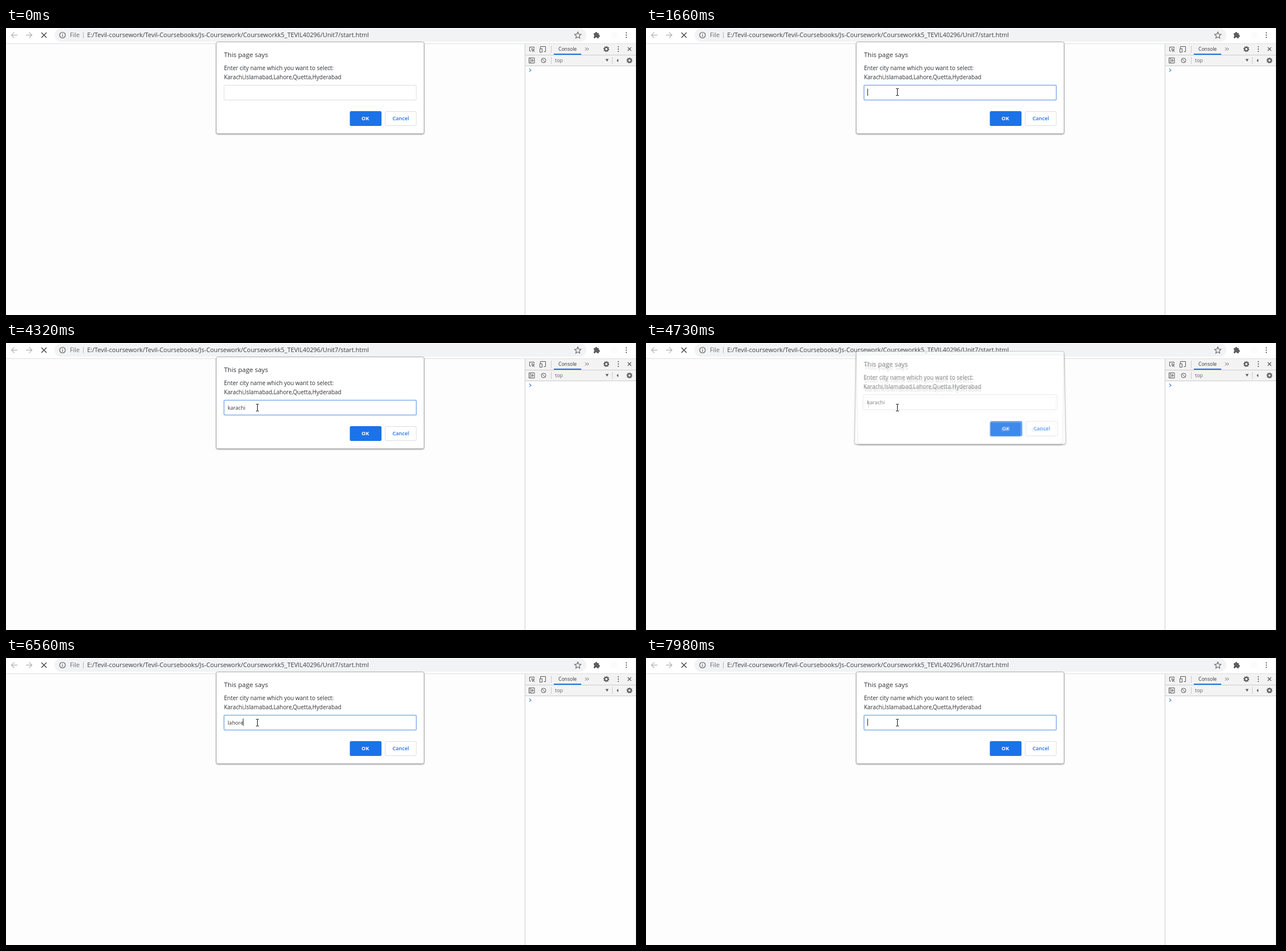
Write an HTML page that moves like this. It is 1111 px wide and 504 px high and loops after 8 s.

```html
<!DOCTYPE html>
<html lang="en">
<head>
<meta charset="utf-8">
<title>Prompt dialog</title>
<style>
html, body { margin: 0; width: 100%; height: 100%; overflow: hidden; background: #fdfdfd; }
#stage { position: relative; width: 1111px; height: 504px; max-width: 100%; max-height: 100%; overflow: hidden; contain: strict; }
svg { position: absolute; left: 0; top: 0; width: 1111px; height: 504px; overflow: hidden; font-family: "Open Sans", "Noto Sans", sans-serif; }
text { white-space: pre; }
.dialog { left: 360px; top: 18px; width: 382px; height: 176px; transform-origin: 191px 6px; }
.panel { filter: drop-shadow(0 1px 1.2px rgba(0, 0, 0, .4)); }
</style>
</head>
<body>
<div id="stage">
<svg viewBox="0 0 1111 504">
  <defs>
    <g id="gear" fill="none" stroke="#5a5a5a">
      <circle r="3" stroke-width="2"/>
      <circle r="4.3" stroke-width="1.7" pathLength="16" stroke-dasharray="1"/>
    </g>
    <g id="kebab"><circle cy="-4" r="1.1"/><circle r="1.1"/><circle cy="4" r="1.1"/></g>
    <path id="back" d="M5.5 0H-5M0-5-5 0 0 5" fill="none" stroke="#b8babd" stroke-width="1.4"/>
  </defs>

  <!-- browser toolbar -->
  <rect width="1105" height="27" fill="#fff"/>
  <path d="M0 27.5H1105" stroke="#dedfe1"/>
  <rect x="85" y="1" width="932" height="23" rx="11.5" fill="#f1f3f4"/>
  <use href="#back" x="14.5" y="12.5"/>
  <use href="#back" transform="translate(40.5 12.5) scale(-1 1)"/>
  <path d="M62 8l9 9m0-9l-9 9" stroke="#4a4d51" stroke-width="1.5"/>
  <g fill="none" stroke="#5f6368" stroke-width="1.2">
    <circle cx="99" cy="12.5" r="5"/>
    <path d="M99 11.7v3.6M99 9.4v1.3"/>
    <path d="M1002 7l1.6 3.8 4.1.4-3.1 2.7.9 4-3.5-2.1-3.5 2.1.9-4-3.1-2.7 4.1-.4z" stroke-width="1.1"/>
  </g>
  <path d="M135.5 7V18" stroke="#b5b8bb"/>
  <g font-size="10.85">
    <text x="112" y="16.3" fill="#6a6e73">File</text>
    <text x="142.2" y="16.3" fill="#3c4043">E:/Tevil-coursework/Tevil-Coursebooks/Js-Coursework/Courseworkk5_TEVIL40296/Unit7/start.html</text>
  </g>
  <path d="M1030 9h2.3a2 2 0 0 1 4 0h2.5v3a2 2 0 0 1 0 4v2h-3a1.7 1.7 0 0 0-3.4 0H1030v-3a1.6 1.6 0 0 0 0-3z" fill="#5a5d61"/>
  <circle cx="1066" cy="12.5" r="6" fill="#fbfbfb"/>
  <use href="#kebab" x="1087" y="12.5" fill="#505357"/>

  <!-- developer tools -->
  <rect x="909" y="28" width="196" height="476" fill="#fefefe"/>
  <rect x="909" y="28" width="196" height="38" fill="#f3f3f3"/>
  <path d="M909.5 28V504M909 47.5H1105M909 66.5H1105M955.5 31V44M955.5 51V63M1062.5 51V63" stroke="#cbcbcb" fill="none"/>
  <g fill="none" stroke="#5a5a5a">
    <path d="M920 40.5h-2.5v-7h8v2.5M921 36l5 2-2 1-1 2.3zM923.5 39l3 3"/>
    <path d="M936.5 36v-3.5h9v9h-3M935.5 36.5h4v6h-4z"/>
    <path d="M916.5 52.5h9.5v9h-9.5zM919 52.5v9M921.5 55l3 2-3 2z"/>
    <circle cx="942" cy="57" r="4"/><path d="M939.2 54.2l5.6 5.6"/>
    <path d="M1015 34.5l2.5 2.5-2.5 2.5M1018.5 34.5l2.5 2.5-2.5 2.5"/>
    <path d="M1089.5 34l6 6m0-6l-6 6" stroke-width="1.2"/>
  </g>
  <text x="968" y="40.3" font-size="8.6" fill="#333">Console</text>
  <rect x="960" y="45" width="48" height="2" fill="#1a73e8"/>
  <text x="962" y="60" font-size="8.9" fill="#666">top</text>
  <path d="M1050.5 54.5h5.5l-2.75 4.5zM1073 54v6l-3-3z" fill="#5a5a5a"/>
  <use href="#gear" x="1052" y="37"/>
  <use href="#gear" x="1092.5" y="57"/>
  <use href="#kebab" x="1073" y="37" fill="#5a5a5a"/>
  <path d="M917 71.5l3 2.7-3 2.7" fill="none" stroke="#4285d8" stroke-width="1.2"/>
  <rect x="1104" width="7" height="504"/>
</svg>

<svg id="pointer" viewBox="0 0 1111 504">
  <circle id="click" cx="439" cy="112" r="10" fill="#ff0" fill-opacity=".47"/>
  <path id="arrow" d="M0 0V13l3-2.8 2 4.6 2-.9-2-4.4h4.2z" fill="#fff" stroke="#000" stroke-width=".9"/>
  <path id="beam" d="M-2.5-6h2l.5.5.5-.5h2M0-5.5V5.5M-2.500 6h2l.5-.5.5.5h2" fill="none" stroke="#111"/>
</svg>
</div>

<template id="prompt">
  <svg class="dialog" viewBox="360 18 382 176">
    <rect class="panel" x="368.5" y="24.5" width="364" height="161" rx="3" fill="#fff" stroke="#b2b2b2"/>
    <g fill="#303236">
      <text x="382" y="51" font-size="11.5">This page says</text>
      <text x="382" y="73.7" font-size="10">Enter city name which you want to select:</text>
      <text x="382" y="90" font-size="9.88">Karachi,Islamabad,Lahore,Quetta,Hyderabad</text>
      <rect class="field" x="382" y="100.5" width="337" height="26" rx="2" fill="#fff"/>
      <text class="value" x="388.5" y="117" font-size="9.2"></text>
    </g>
    <path class="caret" d="M0 106.5V119" stroke="#222"/>
    <rect x="602.5" y="146" width="55.5" height="26" rx="2.5" fill="#1a73e8"/>
    <rect x="664.5" y="146.5" width="54.5" height="25" rx="2.5" fill="#fff" stroke="#dadce0"/>
    <g font-size="9.1" text-anchor="middle">
      <text x="629.7" y="162.3" font-weight="700" fill="#fff">OK</text>
      <text x="691.8" y="162.3" font-weight="600" fill="#1a73e8">Cancel</text>
    </g>
  </svg>
</template>

<script>
const LOOP = 8000;
const $ = id => document.getElementById(id);

// [time, typed text, caret visible]
const typing = [
  [0, '', 0], [1660, '', 1], [2090, '', 0],
  [2580, 'k', 1], [2750, 'ka', 1], [2980, 'kar', 1], [3120, 'kara', 1],
  [3350, 'karac', 1], [3520, 'karach', 1], [3820, 'karachi', 1], [4320, 'karachi', 0],
  [4870, '', 1], [5170, '', 0],
  [5620, 'l', 1], [5700, 'la', 1], [5930, 'lah', 1], [6150, 'laho', 1],
  [6380, 'lahor', 1], [6560, 'lahore', 1], [7080, 'lahore', 0], [7660, 'lahore', 1],
  [7980, '', 1]
];

// [time, closing progress of the old dialog, opening progress of the next]
const swaps = [
  [0, 0, 1],
  [4660, .08, 0], [4730, .8, .55], [4790, 1, .85], [4870, 0, 1],
  [7820, .08, 0], [7890, .9, .65], [7980, 0, 1]
];

const at = (list, t) => list.findLast(row => row[0] <= t);
const show = (el, on) => el.style.display = on ? '' : 'none';

function makeDialog() {
  const root = $('prompt').content.firstElementChild.cloneNode(true);
  $('pointer').before(root);
  const [field, value, caret] = ['field', 'value', 'caret'].map(c => root.querySelector('.' + c));
  return {
    root,
    fill(text, caretOn, focused) {
      value.textContent = text;
      const width = text ? value.getComputedTextLength() : 0;
      caret.setAttribute('transform', `translate(${Math.round(388 + width) + .5})`);
      show(caret, caretOn);
      field.setAttribute('stroke', focused ? '#82aeee' : '#dadce0');
      field.setAttribute('stroke-width', focused ? 1.5 : 1);
    },
    pose(lift, tilt, opacity) {
      root.style.opacity = opacity;
      root.style.transform = lift
        ? `translateY(${-lift}px) perspective(1000px) rotateX(${tilt}deg)` : 'none';
    }
  };
}

const front = makeDialog(), closing = makeDialog();

// The old dialog tips forward as it fades; the next one tips up from behind.
function drawDialogs(t) {
  const [, text, caretOn] = at(typing, t);
  const [, shut, open] = at(swaps, t);
  show(closing.root, shut);
  closing.fill(text, false, false);
  closing.pose(12.3 * shut, 7 * shut, 1 - .68 * shut ** 3);
  front.fill(shut ? '' : text, shut || caretOn, !shut && t >= 1660);
  front.pose(9 * (1 - open), -13 * (1 - open), open);
}

function drawPointer(t) {
  const step = Math.min(9, Math.floor((t - 530) / 80));
  const left = (1 - step / 9) ** 2;
  const x = 440.5 + 547 * left;
  const y = (t >= 1420 && t < 1940 ? 112.5 : 113.5) + 376 * left;
  const inField = x < 719 && y < 127;
  for (const id of ['arrow', 'beam']) {
    $(id).setAttribute('transform', `translate(${x} ${y})`);
    show($(id), step >= 0 && inField === (id === 'beam'));
  }
  show($('click'), t >= 1420 && t < 1480);
}

function frame() {
  const t = performance.now() % LOOP;
  drawDialogs(t);
  drawPointer(t);
  requestAnimationFrame(frame);
}
frame();
</script>
</body>
</html>
```
